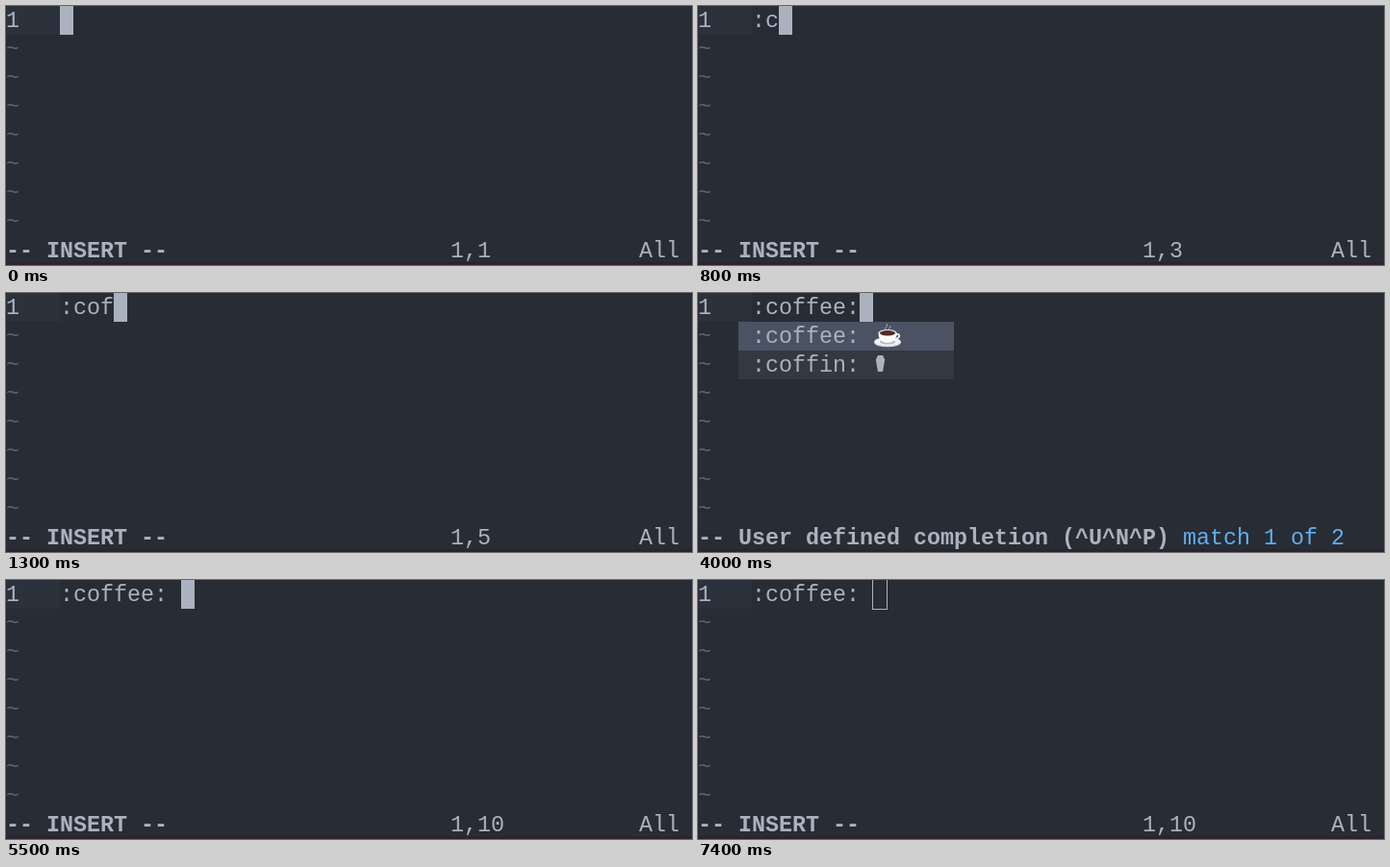
An HTML page that plays this animation: 713x270 px, repeating every 8.4 s.

```html
<!DOCTYPE html>
<html lang="en">
<head>
<meta charset="utf-8">
<title>Emoji completion in a terminal editor</title>
<style>
  html, body { margin: 0; width: 100%; height: 100%; overflow: hidden; background: #282c34; }
  svg { display: block; }
  text { font: 23.333px "Liberation Mono", monospace; white-space: pre; fill: #abb2bf; }
  .bold { font-weight: bold; }
  .dim { fill: #5c6370; }
  .blue { fill: #61afef; }
</style>
</head>
<body>
<svg width="713" height="270" viewBox="0 0 713 270">
  <rect width="713" height="270" fill="#282c34"/>
  <rect y="267" width="713" height="3" fill="#2b2430"/>
  <rect width="56" height="30" fill="#2c323c"/>
  <g id="gutter"></g>
  <g id="screen"></g>
  <g id="menu">
    <rect x="42" y="30" width="224" height="30" fill="#4b5263"/>
    <rect x="42" y="60" width="224" height="30" fill="#333841"/>
    <g id="entries"></g>
    <!-- cup and saucer -->
    <ellipse cx="197" cy="51.5" rx="14" ry="4.8" fill="#d5d8dc"/>
    <ellipse cx="197" cy="50.5" rx="13.5" ry="4.2" fill="#f2f3f4"/>
    <ellipse cx="197" cy="51" rx="8" ry="2.5" fill="#b4b9bf"/>
    <path d="M205 43.5c5-2.5 6.5 3.5-1.5 4.5" fill="none" stroke="#eceeef" stroke-width="2"/>
    <path d="M187.5 41.5c0 6 3 10.5 9.5 10.5s9.5-4.5 9.5-10.5z" fill="#fafafa"/>
    <ellipse cx="197" cy="41.5" rx="9.5" ry="3.6" fill="#e4e6e8"/>
    <ellipse cx="197" cy="41.8" rx="8" ry="2.7" fill="#4e2d24"/>
    <path d="M195.5 39c-3-3 3-4 .5-7M199 39c-2-2 2-3 .5-5" fill="none" stroke="#d5d9df" stroke-opacity=".65"/>
    <!-- coffin -->
    <path d="M187 65h5l2.2 4.5L192 82h-5l-2.2-12.5z" fill="#abb2bf"/>
  </g>
</svg>
<script>
const CELL = 14, ROW = 30, LOOP = 8400;
const byId = id => document.getElementById(id);
const text = (col, row, string, style = "") =>
  `<text x="${col * CELL}" y="${row * ROW + 22}" class="${style}">${string}</text>`;

const insert = position =>
  text(0, 8, "-- INSERT --", "bold") + text(33, 8, position) + text(47, 8, "All");
const typed = line => ({ line, status: insert("1," + (line.length + 1)) });

const states = [
  { at: 0, ...typed("") },
  { at: 300, ...typed(":") },
  { at: 800, ...typed(":c") },
  { at: 1100, ...typed(":co") },
  { at: 1300, ...typed(":cof") },
  { at: 2600, line: ":cof",
    status: text(0, 8, "-- ^X mode (^]^D^E^F^I^K^L^N^O^Ps^U^V^Y)", "bold") },
  { at: 4000, line: ":coffee:", menu: true,
    status: text(0, 8, "-- User defined completion (^U^N^P)", "bold") +
      text(36, 8, "match 1 of 2", "blue") },
  { at: 5500, ...typed(":coffee: ") },
  { at: 7400, ...typed(":coffee: "), hollow: true }
];

function cursor(col, hollow) {
  const x = col * CELL;
  return hollow
    ? `<rect x="${x - .5}" y="-.5" width="15" height="31" fill="none" stroke="#abb2bf"/>`
    : `<rect x="${x}" width="${CELL}" height="${ROW}" fill="#abb2bf"/>`;
}

function render({ line, status, menu, hollow }) {
  byId("screen").innerHTML = text(4, 0, line) + cursor(4 + line.length, hollow) + status;
  byId("menu").style.display = menu ? "" : "none";
}

byId("gutter").innerHTML = text(0, 0, "1") +
  Array.from({ length: 7 }, (_, i) => text(0, i + 1, "~", "dim")).join("");
byId("entries").innerHTML = text(4, 1, ":coffee:") + text(4, 2, ":coffin:");

let shown;
function tick() {
  const time = performance.now() % LOOP;
  const state = states.filter(s => s.at <= time).pop();
  if (state !== shown) render(shown = state);
  requestAnimationFrame(tick);
}
tick();
</script>
</body>
</html>
```
